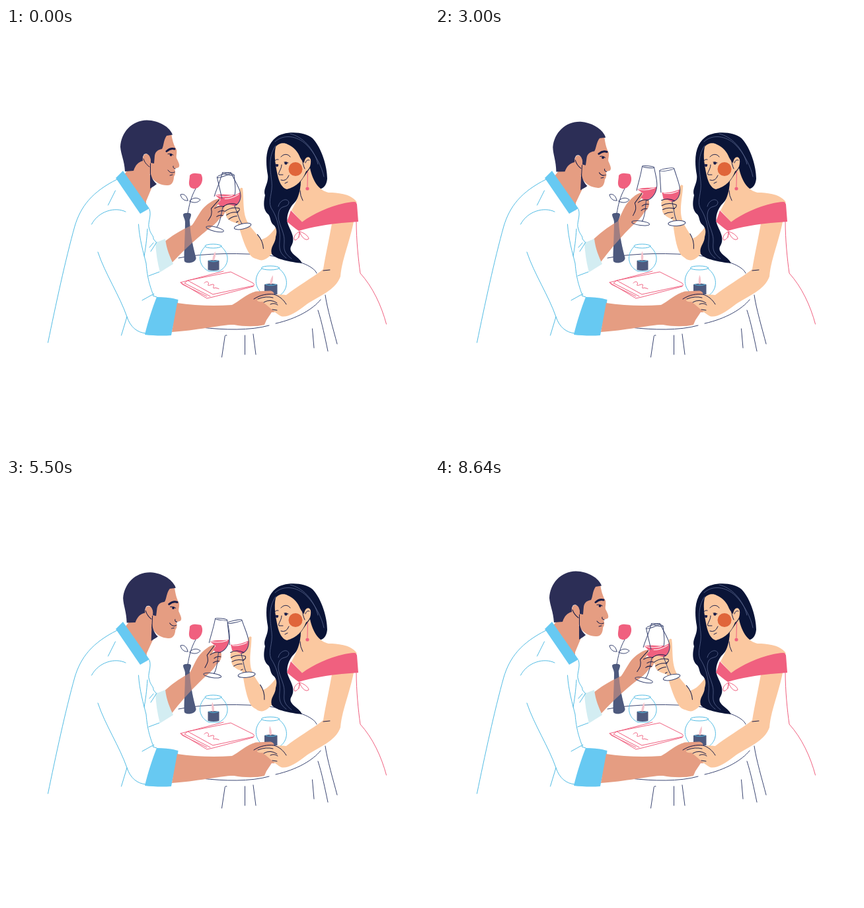
Animation of 640 by 640 pixels, one loop 8710 ms. Source, as an HTML page:

```html
<!DOCTYPE html>
<html lang="en">
<head>
<meta charset="utf-8">
<title>Dinner for two</title>
<style>
  html, body { margin: 0; width: 100%; height: 100%; overflow: hidden; background: #fff; }
  svg { display: block; width: 100vw; height: 100vh; }
  .line { fill: none; stroke-width: 1; stroke-linecap: round; stroke-linejoin: round; }
  .blue { stroke: #52bce4; }
  .navy { stroke: #3b4672; }
  .ink { stroke: #171c48; }
  .pink { stroke: #f0607f; }
  .white { stroke: #fff; }
  .skin-m { fill: #e59d82; }
  .skin-w { fill: #fbc8a0; }
  .rose { fill: #f0607f; }
  .sky { fill: #67c9f2; }
  .slate { fill: #4e5a7e; }
  .hair-m { fill: #2c2e56; }
  .hair-w { fill: #0a1437; }
  .flame { fill: #f6c3cb; }
</style>
</head>
<body>
<svg viewBox="0 0 640 640">
  <defs>
    <path id="vase" class="slate" d="M268 282C270 279 279 279 280 282C280 286 277 290 278 293C279 315 284 335 287.500 348C287 356 273 357 270 353C269 345 271 315 271 293C271 289 268 286 268 282Z"/>
    <path id="flame" class="flame" d="M-1.300 0C-2.300-5-1.500-10 0-14C2-9 2.300-5 1.300 0Z"/>
  </defs>

  <!-- table -->
  <g class="line navy">
    <path d="M261 348C300 340 360 340 400 344.500C440 350 466 360 470 371M296 453C330 457 370 458 398 450M408 447C440 440 465 425 476 411"/>
    <path d="M334 465Q331 464 331 468L326.500 498M361.500 465V494M374 463L378 494M463.500 455L466 484M472 427C478 445 483 470 487 489M483 404C486 425 495 455 501 478"/>
  </g>
  <g class="line pink">
    <path d="M329 368L264 385L304 409L313 407L374 391Q377 388 374 386L340 369L275 382L313 403L374 390M264 385L267 388L304 406M275 382L270 386L309 406"/>
    <path d="M300 386C303 382 308 384 306 388C304 392 312 387 314 388C316 391 310 395 317 393L322 394.500"/>
  </g>
  <g class="line blue">
    <path d="M301 331C288 344 293 362 307 368H322C336 362 341 344 326 331"/>
    <ellipse cx="313.500" cy="330" rx="12.500" ry="3"/>
    <path d="M387 364C372 378 378 397 391 404M413 364C429 376 427 396 415 404"/>
    <ellipse cx="400" cy="363" rx="13.500" ry="3"/>
  </g>
  <path class="slate" d="M305.500 352Q314 350 322.500 352V366Q314 368 305.500 366ZM391 388Q400 385 410.500 388V403H391Z"/>
  <path class="line blue" d="M307 352Q314 355 321 352M393 388Q401 391 409 388"/>
  <use href="#flame" id="flameA"/>
  <use href="#flame" id="flameB"/>

  <!-- his right arm -->
  <use href="#vase"/>
  <g id="armM">
    <path class="skin-m" d="M236 322C250 307 263 298 274 291C279 282 282 270 288 262C294 254 302 247 309 245.500C312 250 307 257 305 261C309 255 315 253 320 256C322 264 320 270 314 275C309 285 301 292 295 298C283 311 266 331 250 355L238 352Z"/>
    <path class="rose" d="M302 241C312 237 322 239 331.500 236C331 247 324 256 315 256.500C312 256 310 255 308 254L311 247Z"/>
    <path class="line white" d="M304 241Q316 243 328 238"/>
    <g class="line navy">
      <ellipse cx="317" cy="206.500" rx="9" ry="1.300" transform="rotate(3 317 206.500)"/>
      <path d="M308 206C306 222 302 235 301 243M326 207C329 220 333 230 331 238C330 248 323 256 316 257L315 274C314 282 313 287 311 289"/>
      <ellipse cx="309" cy="292" rx="13.500" ry="3.300" transform="rotate(5 309 292)"/>
    </g>
    <path class="line ink" d="M309 247L299 262C303 272 299 276 297 281M304 261Q311 255 319 257M310 266Q314 262 320 263M309 273Q313 269 318 270"/>
  </g>
  <use href="#vase" opacity=".45"/>
  <path class="rose" d="M278 223C282 218 289 220 295 221C299 227 297 236 292 240C288 244 283 244 279 241C275 236 278 230 278 223Z"/>
  <path class="line navy" d="M287 243C280 255 277 268 275 281M275 261C270 262 265 258 264 252C270 250 274 255 275 261M278 262C282 256 290 256 294 260C290 265 283 265 278 262"/>
  <path fill="#d3edf2" d="M226 325L241 319C243 335 248 346 253 357L233 369.500C229 355 227 340 226 325Z"/>

  <!-- his head -->
  <g id="head">
    <path class="skin-m" d="M186 212L210 194L222 238L212 262V274Q192 250 176 226Z"/>
    <path class="skin-m" d="M250 160C252 172 255 180 258 184C259 190 257 193 258 197C261 203 264 208 261 211L255 213C257 218 256 222 254 225C254 232 251 239 243 238C235 238 225 234 219 224L206 200L224 180L240 160Z"/>
    <path class="hair-m" d="M180 217C179 200 174 192 173 180C174 158 190 140 213 139.500C232 140 248 150 252 161.500L243 163C238 170 239 178 236 183C230 184 226 187 225 193L224 205L219 204C219 193 214 188 209 191C206 195 207 199 207 201C200 203 196 207 193 216Z"/>
    <path class="skin-m" d="M208 193C212 188 218 192 219 200L218 212C212 210 206 202 208 193Z"/>
    <path class="hair-m" d="M218 217V243C222 240 226 238 228 236C222 231 220 225 218 217Z"/>
    <path class="line ink" d="M208 198C210 204 213 207 217 210M218.500 205V224M245 190.500Q249 189 253 192M245 215C248 219 251 220 255 218M248 223L252 222M253 209Q252 212 256 213"/>
    <path class="line ink" style="stroke-width:3" d="M243 186.500Q249 181 255 183"/>
    <circle cx="249.500" cy="192" r="1.900" fill="#171c48"/>
  </g>

  <!-- his shirt -->
  <path class="sky" d="M166 227L177 216L217 273L203 281Z"/>
  <path class="line blue" d="M63.500 476C75 420 90 350 104 300C113 270 130 248 168 229M165.500 246L154.500 268M129.500 297C140 277 165 270 181 278M139 339C150 372 172 405 183 437C188 452 198 461 212 462M183 437L174.500 465M200.500 297C202 320 208 340 212 356C214 380 218 390 222 402M217 274C221 285 213 296 217 304C218 311 224 315 223 319L227 324M214 304C213 320 211 335 209 345M223 325L217 332M228 324L219 338M216 375L232 369M206 412L224 402L222 405L228 407"/>
  <path class="sky" d="M228 407C240 407 250 408 260.500 411C259 430 253 448 250 465C238 466 222 465.500 210 464C215 443 221 425 228 407Z"/>

  <!-- her raised arm -->
  <path class="skin-w" d="M371 328C372 343 378 351.500 387 351.500C397 350 405 340 411 325V298C403 309 396 317 389 319Z"/>
  <g id="armW">
    <path class="skin-w" d="M351 256C346 260 347 266 349 270C346 276 352 283 363 288C364 310 366 330 371 340C378 352 397 352 397 335C394 318 380 302 377 287C374 272 380 255 382 238C380 235 376 237 376 244L371 258Z"/>
    <path class="rose" d="M349.500 246C358 248 368 246 377 243C378 252 372 261 364 261.500L358 258L351 256Z"/>
    <path class="line white" d="M352 247.500Q363 250 374 245.500"/>
    <g class="line navy">
      <ellipse cx="359" cy="212" rx="11" ry="1.700" transform="rotate(-6 359 212)"/>
      <path d="M348 213L348 246M370 211C373 224 377 235 377 243C377 252 372 260 364 261L366 276Q367 287 369 290"/>
      <ellipse cx="369" cy="294" rx="13" ry="4" fill="#fff"/>
    </g>
    <path class="line ink" d="M348 258Q358 254 368 260M348 266Q358 261 370 266Q371 270 366 271M349 272Q357 268 367 272M351 279Q357 276 364 277M361 286L364 285M388 311Q394 322 392 334"/>
  </g>

  <!-- her body -->
  <path class="hair-w" d="M408 166C420 155 452 156 464 167C478 182 486 210 486 228C485 239 480 242 476 243.500C468 240 463 232 460 222L446 237C446 252 441 260 433 268C427 276 423 288 427 298C431 308 439 318 431 331C427 341 444 346 448 356C430 354 408 350 402 342C399 331 408 326 408 316C410 309 410 304 406 299C399 294 401 287 397 282C388 275 390 262 392 253C388 244 398 235 396 222C392 200 393 178 408 166Z"/>
  <path class="skin-w" d="M446 232C446 248 440 262 432 276L448 294L531 264C524 252 505 249 488 249C474 246 464 232 460 212Z"/>
  <path class="skin-w" d="M408 180C412 174 421 173 426 176C436 180 442 188 445 196Q449 203 451 204C452 195 459 192 461 199C462 207 459 214 454 217C449 230 440 240 425 244C417 242 413 232 411 223C408 208 405 195 408 180Z"/>
  <g class="line" stroke="#5a668f" style="stroke-width:.8">
    <path d="M407 172C420 160 440 163 454 176C468 190 478 210 481 225M430 160C448 164 466 182 472 206M408 178C396 195 400 215 402 232C404 250 396 260 401 272C409 284 412 296 414 310C416 324 408 337 424 348M412 270C414 260 426 256 428 264C427 272 418 268 414 275C408 288 417 300 420 313C424 328 414 336 432 349"/>
  </g>
  <circle cx="438" cy="213.500" r="10.500" fill="#e0653a"/>
  <path class="line ink" d="M406 202Q408 198 412 199M416 195C420 190 427 190 430 195M417 207C417 214 411 219 413 222L419 222M416 230Q424 233 428 223M422 235L426 233M407 206L412 207M421 203L427 204M448 196Q449 207 452 213M445 246Q445 254 449 261M453 204Q455 198 459 200"/>
  <g fill="#171c48"><circle cx="410" cy="208" r="2"/><circle cx="423.500" cy="204.500" r="2.200"/></g>
  <path class="line pink" d="M456.500 217L456 240"/>
  <circle class="rose" cx="456" cy="243" r="2.600"/>

  <!-- hands on the table -->
  <path class="skin-m" d="M259 416C285 420 315 421 342 419C352 414 364 402 378 398.500L400 397.500C407 399 407 404 402 407L411 418C412 427 408 431 402 430L394 442L391 449C380 452 360 452 345 449C330 448 300 456 251 460Z"/>
  <path class="skin-w" d="M494 290C489 320 484 340 480 365C462 379 440 391 424 404C410 402 394 404 381 409C378 413 382 415 388 414C397 421 407 431 416 436C425 439 440 430 455 418C475 405 499 396 506 376C508 350 521 322 527 288Z"/>
  <path class="line ink" d="M375 410C386 403 396 402 405 403C413 405 420 411 424 418M381 410Q394 405 404 408M390 415Q400 409 410 416M400 418Q406 415 411 419M403 426L410 427M480 367L490 366"/>
  <path class="rose" d="M431 276L448 293.500C470 277 505 264 527 263Q530 263 531 267L533 293C500 295 470 299 443 307C437 303 430 297 425 293Z"/>
  <path class="line pink" d="M444 308C437 311 434 318 437 321C442 320 445 314 444 308C450 309 458 315 458 319C453 323 447 316 444 308L443 317M530 293C530 320 533 350 536 371C555 392 568 420 575.500 448"/>
</svg>
<script>
  const LOOP = 8710, STEPS = 122;
  const byId = id => document.getElementById(id);
  const turn = (id, angle, x, y) => byId(id).setAttribute('transform', `rotate(${angle} ${x} ${y})`);
  const stand = (id, angle, x, y) => byId(id).setAttribute('transform', `translate(${x} ${y}) rotate(${angle})`);

  function draw(now) {
    const step = Math.floor(((now % LOOP) + 5) / LOOP * STEPS) % STEPS;
    const phase = step / STEPS * Math.PI * 4;
    const toast = (1 + Math.cos(phase)) / 2;   // 1 = glasses touch
    turn('head', 4.2 * (1 - toast), 170, 285);
    turn('armM', 8.7 * (toast - .05), 228, 347);
    turn('armW', -13.7 * (toast - .05), 390, 345);
    const sway = 4 + 10 * Math.cos(2 * phase - .35);
    stand('flameA', sway, 313.5, 351.5);
    stand('flameB', sway, 400.5, 387.5);
  }

  const start = performance.now();
  function tick(now) {
    draw(Math.max(0, now - start));
    requestAnimationFrame(tick);
  }
  draw(0);
  requestAnimationFrame(tick);
</script>
</body>
</html>
```
